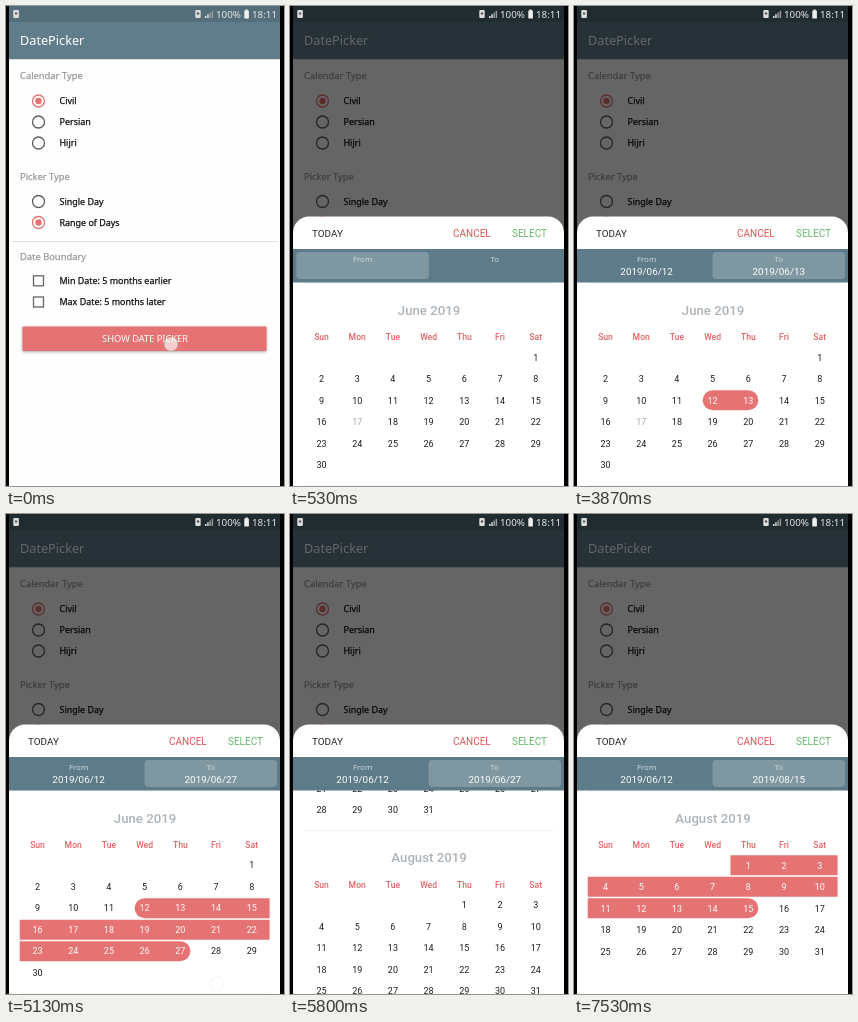
Recreate the animation shown at these times as an HTML page with a canvas. Size 278 by 480 pixels, loop 8 s.

```html
<!DOCTYPE html>
<html>
<head>
<meta charset="utf-8">
<title>Date picker</title>
<style>
html, body { margin: 0; width: 100%; height: 100%; overflow: hidden; background: #000; }
canvas { display: block; width: 278px; height: 480px; }
</style>
</head>
<body>
<canvas id="stage" width="278" height="480"></canvas>
<script>
const ctx = document.getElementById('stage').getContext('2d');
const LOOP = 8000;
const SANS = '"Noto Sans", "Open Sans", sans-serif';
const ROBOTO = 'Roboto, Arial, sans-serif';
const RED = '#e57373', SLATE = '#5d7b88';
const SIDE = 3, WIDTH = 271;
const COL = 35.7, ROW = 21.5, LEFT = 13.7;
const WEEK = ['Sun', 'Mon', 'Tue', 'Wed', 'Thu', 'Fri', 'Sat'];
// name, number, weekday of the 1st, length, days before it since June 1
const MONTHS = [['June', 6, 6, 30, 0], ['July', 7, 1, 31, 30], ['August', 8, 4, 31, 61]];
const TODAY = 17;
// time, x, y of each tap; the tap takes effect TAP ms after it starts
const TAP = 130;
const TAPS = [[1400, 139, 398], [2270, 205, 262], [3270, 174, 399], [4130, 174, 440], [7200, 174, 399]];

const clamp = v => Math.max(0, Math.min(1, v));
const span = (t, a, b) => clamp((t - a) / (b - a));
const easeOut = u => 1 - (1 - u) ** 3;

function rect(x, y, w, h, color, radius = 0) {
  ctx.fillStyle = color;
  ctx.beginPath();
  ctx.roundRect(x, y, w, h, radius);
  ctx.fill();
}

const band = (y, h, color, radius) => rect(SIDE, y, WIDTH, h, color, radius);

// y is the middle of the capitals; bold adds a thin outline
function text(str, x, y, size, color, { font = SANS, weight = 400, align = 'left', bold = 0 } = {}) {
  ctx.font = `${weight} ${size}px ${font}`;
  ctx.textAlign = align;
  ctx.fillStyle = ctx.strokeStyle = color;
  ctx.fillText(str, x, y + size * 0.357);
  if (bold) {
    ctx.lineWidth = bold;
    ctx.strokeText(str, x, y + size * 0.357);
  }
}

const centered = (str, x, y, size, color, weight = 400, font = ROBOTO) =>
  text(str, x, y, size, color, { font, weight, align: 'center' });

function circle(x, y, r, fill, stroke, width = 1.3) {
  ctx.beginPath();
  ctx.arc(x, y, r, 0, 7);
  if (fill) { ctx.fillStyle = fill; ctx.fill(); }
  if (stroke) { ctx.strokeStyle = stroke; ctx.lineWidth = width; ctx.stroke(); }
}

const label = (str, y) => text(str, 53.5, y, 8.95, '#111', { bold: 0.25 });
const heading = (str, y) => text(str, 14, y, 9.35, '#999', { bold: 0.25 });

function radio(str, y, on) {
  circle(32.5, y, 6, null, on ? RED : '#5c5c5c');
  if (on) circle(32.5, y, 3.2, RED);
  label(str, y);
}

function checkbox(str, y) {
  ctx.strokeStyle = '#666';
  ctx.lineWidth = 1.3;
  ctx.strokeRect(27.5, y - 5, 10, 10);
  label(str, y);
}

function page() {
  band(0, 480, '#fefefe');
  band(16, 37, '#607d8b');
  band(53, 1, '#d8dcde');
  text('DatePicker', 14, 34.5, 12.7, '#fff');
  heading('Calendar Type', 70);
  radio('Civil', 95, true);
  radio('Persian', 116, false);
  radio('Hijri', 137, false);
  heading('Picker Type', 171);
  radio('Single Day', 195.5, false);
  radio('Range of Days', 216.5, true);
  rect(5, 235, 267, 1, '#ddd');
  heading('Date Boundary', 250.3);
  checkbox('Min Date: 5 months earlier', 274.8);
  checkbox('Max Date: 5 months later', 296);
  ctx.shadowColor = 'rgba(0,0,0,.35)';
  ctx.shadowBlur = 3;
  ctx.shadowOffsetY = 1;
  rect(16.5, 320.5, 244, 24.5, RED, 1);
  ctx.shadowColor = 'transparent';
  centered('SHOW DATE PICKER', 139, 333, 9.25, '#fff', 400, SANS);
}

function statusBar(dim) {
  band(0, 16, '#546e7a');
  band(0, 16, `rgba(0,0,0,${0.6 * dim})`);
  rect(7.3, 4, 5.6, 8, '#ddd', 1);
  rect(9, 6.5, 2.2, 2, '#555');
  rect(189.3, 4, 5.4, 8, '#ddd', 1);
  circle(192, 7.5, 1.2, '#555');
  for (let i = 0; i < 4; i++) rect(199 + i * 2.2, 10 - i * 1.7, 1.5, 2 + i * 1.7, i < 2 ? '#ddd' : '#999');
  text('100%', 210, 8.5, 9.8, '#e8e8e8');
  rect(238.3, 4.5, 4.6, 8, '#eee', 0.6);
  rect(239.5, 3.5, 2.2, 1.5, '#eee');
  text('18:11', 246, 8.5, 9.8, '#e8e8e8');
}

function dateText(day) {
  const m = MONTHS.findLast(m => day > m[4]);
  return `2019/0${m[1]}/${String(day - m[4]).padStart(2, '0')}`;
}

function tab(name, x, day, active) {
  if (active) rect(x - 66.3, 246, 132.6, 27, 'rgba(255,255,255,.21)', 4);
  centered(name, x, 253.4, 7.9, '#ced9dd', 400, SANS);
  if (day) centered(dateText(day), x, 265.5, 9.9, '#fff');
}

// Draws one month below its separator and returns the y of the next one
function month([name, , first, length, before], top, from, to) {
  const rows = Math.ceil((first + length) / 7);
  rect(14, top - 0.5, 250, 1, '#f0f0f0');
  centered(name + ' 2019', 139, top + 27, 13.2, '#adb4b9', 500);
  WEEK.forEach((d, i) => centered(d, 31.5 + i * COL, top + 54, 8.6, '#e46464', 500));
  for (let r = 0; r < rows; r++) {
    const y = top + 74.3 + r * ROW;
    const start = Math.max(1, r * 7 - first + 1);
    const end = Math.min(length, r * 7 - first + 7);
    const a = Math.max(start, from - before), b = Math.min(end, to - before);
    const col = d => (d + first - 1) % 7;
    if (from && a <= b) {
      const head = a + before === from, tail = b + before === to;
      const x1 = LEFT + col(a) * COL + (head ? COL / 2 - 10 : 0);
      const x2 = LEFT + (col(b) + 1) * COL - (tail ? COL / 2 - 10 : 0);
      const l = head ? 10 : 0, rr = tail ? 10 : 0;
      rect(x1, y - 10, x2 - x1, 20, RED, [l, rr, rr, l]);
    }
    for (let d = start; d <= end; d++) {
      const picked = from && d >= a && d <= b;
      const color = picked ? '#fff' : d + before === TODAY ? '#aaa' : '#1c1c1c';
      centered(d, 31.5 + col(d) * COL, y, 9, color);
    }
  }
  return top + 73.5 + rows * ROW;
}

function dialog(t, shift) {
  const done = i => t >= TAPS[i][0] + TAP;
  const from = done(0) ? 12 : 0;
  const to = done(4) ? 76 : done(3) ? 27 : done(2) ? 13 : from;
  const scroll = 186.5 * span(t, 5130, 5470) ** 1.2 + 197 * easeOut(span(t, 5470, 6270));

  ctx.save();
  ctx.translate(0, shift);
  band(210.6, 270, '#fff', [16, 16, 0, 0]);
  ctx.save();
  ctx.beginPath();
  ctx.rect(SIDE, 276, WIDTH, 204);
  ctx.clip();
  let top = 277 - scroll;
  for (const m of MONTHS) top = month(m, top, from, to);
  ctx.restore();

  text('TODAY', 22, 227.3, 9.9, '#222', { font: ROBOTO });
  text('CANCEL', 163, 227.3, 10, '#e25555', { font: ROBOTO });
  text('SELECT', 222, 227.3, 10, '#66b96a', { font: ROBOTO });
  band(243, 33.5, SLATE);
  tab('From', 72.6, from, !done(1));
  tab('To', 204.8, done(2) ? to : 0, done(1));
  ctx.restore();
}

function touch(x, y, alpha) {
  if (alpha <= 0) return;
  ctx.globalAlpha = alpha;
  circle(x, y, 7, 'rgba(255,255,255,.65)', 'rgba(120,120,120,.18)', 1);
  ctx.globalAlpha = 1;
}

function draw(t) {
  const open = span(t, 170, 500);
  ctx.fillStyle = '#000';
  ctx.fillRect(0, 0, 278, 480);
  page();
  band(16, 464, `rgba(0,0,0,${0.6 * open})`);
  statusBar(open);
  if (open) dialog(t, 269 * (1 - easeOut(open)));

  touch(165, 338, 1 - span(t, 70, 200));
  for (const [start, x, y] of TAPS)
    touch(x, y, span(t, start - 30, start + 40) - span(t, start + TAP, start + 300));
  touch(211, 470 - 154 * span(t, 5130, 5470), span(t, 5100, 5160) - span(t, 5440, 5600));
}

function tick(now) {
  draw(now % LOOP);
  requestAnimationFrame(tick);
}
requestAnimationFrame(tick);
</script>
</body>
</html>
```
